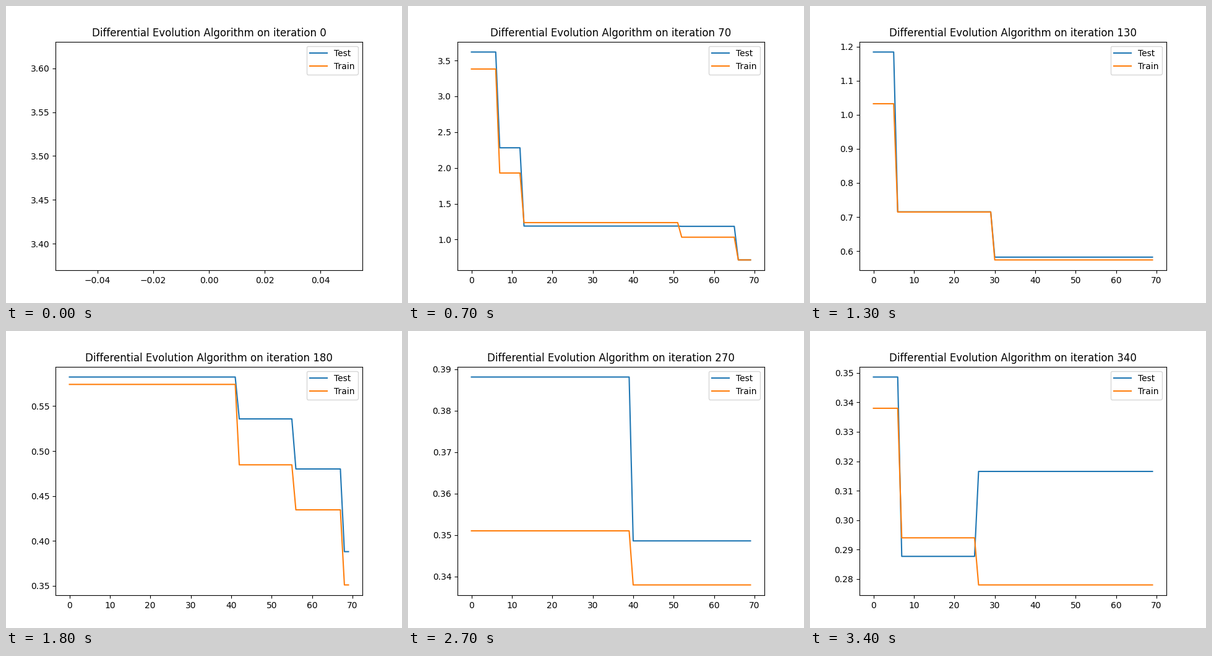
Write a matplotlib script that moves like this. It is 640x480 px and loops after 4.41 s.

```python
import numpy as np
import matplotlib.pyplot as plt
from matplotlib.animation import FuncAnimation

INTERVAL = 30      # ms per drawn frame
LOOP = 4410        # ms per loop
STEP = 100         # ms per plot update
LAST = 34          # final update, held to the end of the loop
WINDOW = 70        # iterations kept on the chart

# (first iteration, test error, train error)
LEVELS = [
    (0, 3.6185, 3.3815),
    (8, 2.281, 1.929),
    (14, 1.188, 1.236),
    (53, 1.1839, 1.0323),
    (67, 0.7152, 0.7148),
    (91, 0.5824, 0.5742),
    (153, 0.5358, 0.4847),
    (167, 0.4801, 0.4346),
    (179, 0.38808, 0.35103),
    (241, 0.34861, 0.33800),
    (278, 0.28770, 0.29400),
    (297, 0.31655, 0.27800),
]

starts, test, train = np.array(LEVELS).T
level = np.searchsorted(starts, np.arange(10 * LAST + 1), side="right") - 1
history = test[level], train[level]

fig, ax = plt.subplots(figsize=(6.4, 4.8), dpi=100)
lines = [ax.plot([], [], label=name)[0] for name in ("Test", "Train")]
ax.legend(loc="best")


def update(frame):
    # the lead keeps updates that fall inside a frame from showing late
    step = min(LAST, (frame * INTERVAL + 20) // STEP)
    iteration = 10 * step
    first = max(0, iteration - WINDOW + 1)
    for line, values in zip(lines, history):
        shown = values[first:iteration + 1]
        line.set_data(np.arange(len(shown)), shown)
    ax.set_title(f"Differential Evolution Algorithm on iteration {iteration}")
    ax.relim()
    ax.autoscale_view()
    return lines


anim = FuncAnimation(fig, update, frames=LOOP // INTERVAL, interval=INTERVAL,
                     init_func=lambda: update(0), repeat=True, repeat_delay=0)
plt.show()
```
